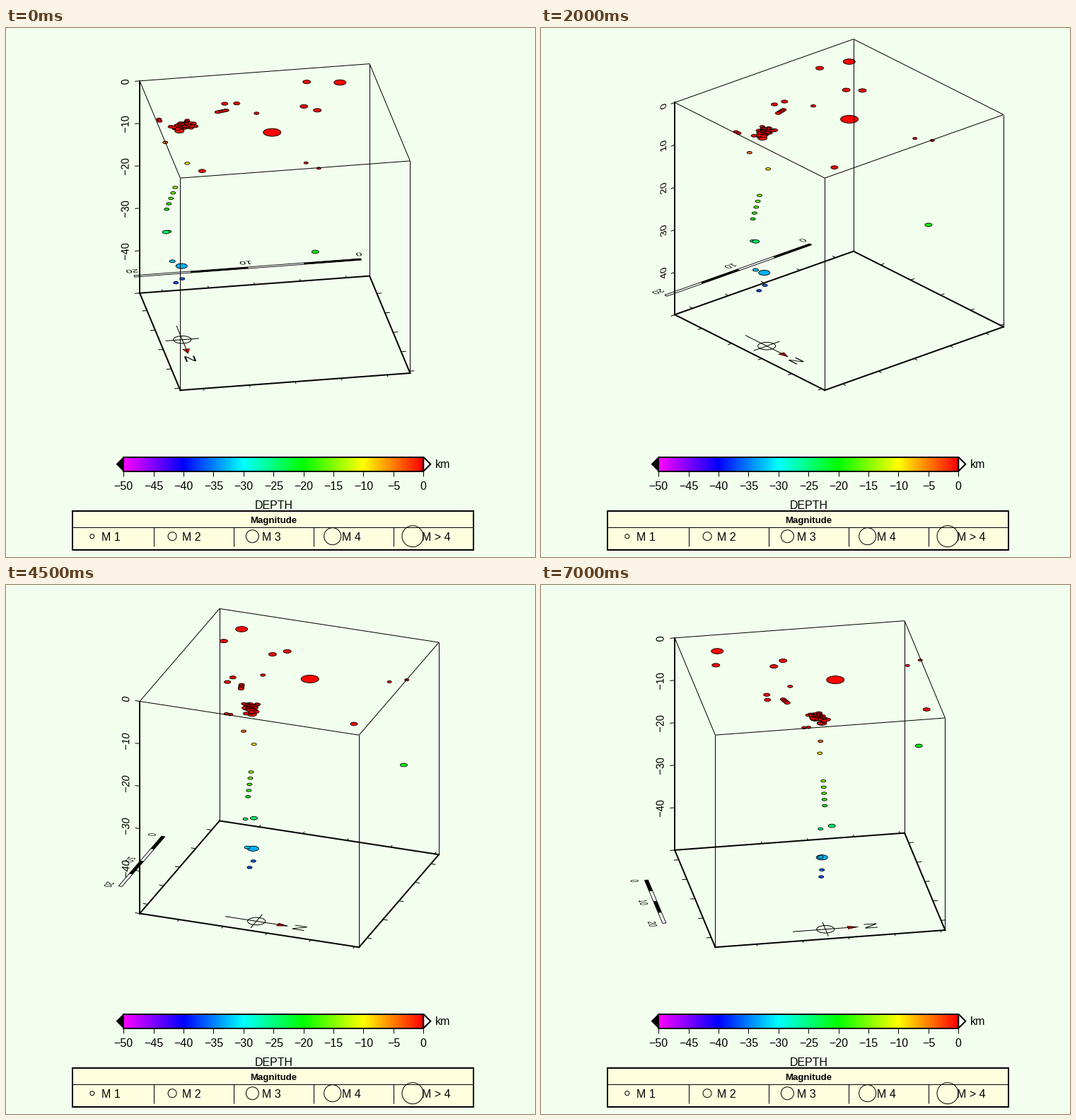
Write a matplotlib script that moves like this. It is 748 by 748 pixels and loops after 8 s.

```python
import colorsys
import math

import numpy as np
import matplotlib.pyplot as plt
from matplotlib.animation import FuncAnimation
from matplotlib.lines import Line2D
from matplotlib.patches import Circle, Ellipse, PathPatch, Polygon, Rectangle
from matplotlib.textpath import TextPath
from matplotlib.transforms import Affine2D

SIZE, DPI = 748, 64
PX = 72 / DPI
PAPER, CREAM = "#f3ffee", "#ffffdf"
SANS = "Liberation Sans"
FONT = 16

TILT, LIFT = math.sin(math.radians(25)), math.cos(math.radians(25))
HALF, HEIGHT = 165, 300
KM = HEIGHT / 50
START, STEP = 10, 30

# Ground directions of the box in the first view (y points to the viewer)
EAST = np.array([math.cos(math.radians(START)), -math.sin(math.radians(START))])
NORTH = np.array([math.sin(math.radians(START)), math.cos(math.radians(START))])
COMPASS = np.array([-131, 22])


def chain(first, last, count=2, width=8):
    """Quakes evenly spaced between two points (ground x, ground y, drop)."""
    return [(*p, width) for p in np.linspace(first, last, count)]


def single(x, y, drop, width):
    return chain((x, y, drop), (x, y, drop), 1, width)


def swarm(count=42):
    """A tight shallow cluster stretched along one diagonal."""
    rng = np.random.default_rng(7)
    x = np.clip(rng.normal(-125, 9, count), -147, -102)
    y = 9 - 0.6 * (x + 125) + np.clip(rng.normal(0, 6, count), -11, 11)
    drop = np.minimum(abs(rng.normal(0, 3, count)), 6)
    return list(zip(x, y, drop, rng.uniform(7, 10, count)))


def make_quakes():
    surface = (
        single(-4, 36, 1, 26) + single(92, -131, 1, 18) + single(45, -133, 1, 12)
        + single(-103, 165, 1, 11) + single(-26, -28, 1, 8)
        + chain((41, -51, 1), (60, -38, 1), width=12)
        + chain((44, 138, 1), (62, 156, 1), width=7)
        + chain((-71, -60, 1), (-54, -61, 1), width=10)
        + chain((-81, -32, 1), (-69, -38, 1), 4, 9)
        + chain((-164, -8, 1), (-163, -2, 1))
    )
    column = (
        single(-135, 17, 7, 14)
        + chain((-155, 15, 24), (-124, 14, 54))
        + chain((-141, 19, 86), (-153, 21, 116), 5)
        + single(-154, 31, 144, 11) + single(-150, 15, 150, 8)
        + single(-145, 15, 192, 9) + single(-132, 17, 198, 17)
        + chain((-131, 17, 216), (-140, 16, 222))
    )
    return surface + swarm() + column + single(57, 154, 120, 11)


def depth_color(km):
    return colorsys.hsv_to_rgb(km / 60, 1, 1)


def turn(v, view):
    """Project a ground vector onto the screen."""
    a = math.radians(STEP * view)
    c, s = math.cos(a), math.sin(a)
    return np.array([v[0] * c + v[1] * s, (v[1] * c - v[0] * s) * TILT])


def top_centre(view):
    a = math.radians(START + STEP * view)
    reach = HALF * (abs(math.cos(a)) + abs(math.sin(a)))
    return np.array([188.8 + reach, 211.5 - reach * TILT])


fig = plt.figure(figsize=(SIZE / DPI, SIZE / DPI), dpi=DPI, facecolor=PAPER)
ax = fig.add_axes([0, 0, 1, 1])
ax.axis("off")


def line(p, q, width=1):
    return ax.add_line(Line2D([p[0], q[0]], [p[1], q[1]], color="black",
                              lw=width * PX,
                              solid_capstyle="projecting" if width > 1 else "butt"))


def shape(patch, fill="none", width=1):
    patch.set(facecolor=fill, edgecolor="black", linewidth=width * PX)
    return ax.add_patch(patch)


def label(x, y, s, ha="center", size=FONT, weight="normal"):
    ax.text(x, y, s, ha=ha, va="baseline", family=SANS, fontsize=size * PX,
            weight=weight, color="black")


def plane_text(s, centre, right, up, size=FONT):
    """Text lying in a plane given by its projected axes."""
    path = TextPath((0, 0), s, size=size, prop={"family": SANS})
    box = path.get_extents()
    place = Affine2D(np.array([[right[0], up[0], centre[0]],
                               [right[1], up[1], centre[1]],
                               [0, 0, 1]]))
    shift = Affine2D().translate(-(box.x0 + box.x1) / 2, -(box.y0 + box.y1) / 2)
    flat = (shift + place).transform_path(path)
    return ax.add_patch(PathPatch(flat, facecolor="black", lw=0))


def draw_box(view):
    mid, drop = top_centre(view), np.array([0, HEIGHT])
    e, n = turn(EAST, view), turn(NORTH, view)
    signs = [(-1, -1), (1, -1), (1, 1), (-1, 1)]
    corners = [mid + HALF * (i * e + j * n) for i, j in signs]
    arts = []
    for k, p in enumerate(corners):
        q = corners[(k + 1) % 4]
        arts += [line(p, q), line(p, p + drop), line(p + drop, q + drop, 2)]
    for along, out, offset in ((e, n, 0.1), (n, e, 0.18)):
        for side in (-7, 7):
            for t in offset + 0.2 * np.arange(5):
                edge = math.copysign(HALF, side) * out
                p = mid + drop + HALF * (2 * t - 1) * along + edge
                arts.append(line(p, p + side * out))

    # Depth axis on the leftmost edge, lettered in the wider wall
    left = min(range(4), key=lambda k: corners[k][0])
    p = corners[left]
    near = max((corners[(left + d) % 4] for d in (1, 3)), key=lambda c: c[0])
    wall = (near - p) / (2 * HALF)
    arts.append(line(p, p + drop, 2))
    signed = view != 1
    for km in range(0, 51, 10):
        at = p + (0, km * KM)
        arts.append(line(at, at - 7 * wall))
        if km < 50:
            spot = at - 21.3 * wall
            if km and not signed:
                spot = spot - (0, 0.292 * FONT * LIFT)
            text = f"\u2212{km}" if km and signed else str(km)
            arts.append(plane_text(text, spot, (0, -LIFT), -wall))
    return arts


def draw_scale(view):
    along, below = turn(-EAST, view), turn(-NORTH, view)
    length = 236 + 91 * math.cos(math.radians(2 * STEP * view + START))
    middle = top_centre(view) + (0, HEIGHT) + (HALF + 57) * below
    zero = middle - along * length / 2
    arts = []
    for k in range(4):
        p, q = (zero + along * length * m / 4 for m in (k, k + 1))
        w = 2.5 * below
        arts.append(shape(Polygon([p - w, q - w, q + w, p + w]),
                          "white" if k % 2 else "black", 0.9))
    for k, text in enumerate(("0", "10", "20")):
        spot = zero + along * length * k / 2 + 17 * below
        arts.append(plane_text(text, spot, along, -below))
    return arts


def draw_compass(view):
    e, n = turn(EAST, view), turn(NORTH, view)
    c = top_centre(view) + (0, HEIGHT) + turn(COMPASS, view)
    head = [c + 32 * n - 5 * e, c + 46 * n, c + 32 * n + 5 * e]
    return [
        line(c - 24 * e, c + 24 * e),
        line(c - 47 * n, c + 47 * n),
        shape(Ellipse(c, 25, 25 * TILT)),
        shape(Polygon(head), "red", 0.6),
        plane_text("N", c + 65 * n, -e, n, 26),
    ]


def draw_quakes(view):
    mid = top_centre(view)
    spots = []
    for x, y, drop, w in QUAKES:
        p = turn((x, y), view)
        nearness = p[1] / TILT * LIFT - drop * TILT / LIFT
        spots.append((nearness, mid[0] + p[0], mid[1] + p[1] + drop, drop, w))
    return [shape(Ellipse((x, y), w - 1, w * TILT), depth_color(drop / KM), 0.9)
            for _, x, y, drop, w in sorted(spots)]


def draw_colorbar():
    x0, x1, y0, y1 = 166, 590, 606, 626
    mid = (y0 + y1) / 2
    ramp = [[depth_color(50 * (1 - t)) for t in np.linspace(0, 1, x1 - x0)]]
    ax.imshow(ramp, extent=(x0, x1, y1, y0), aspect="auto",
              interpolation="nearest")
    shape(Polygon([(x0, y0), (x0 - 10, mid), (x0, y1)]), "black")
    shape(Polygon([(x1, y0), (x1 + 10, mid), (x1, y1)]), "white", 2)
    shape(Rectangle((x0, y0), x1 - x0, y1 - y0), width=2)
    for value in range(-50, 1, 5):
        x = x1 + (x1 - x0) * value / 50
        line((x, y1), (x, y1 + 7))
        label(x, 652, str(value).replace("-", "\u2212"))
    label(607, 621, "km", "left")
    label(378, 679, "DEPTH")


def draw_legend():
    shape(Rectangle((94, 682), 567, 55), CREAM, 2)
    line((94, 705), (661, 705))
    label(378, 699, "Magnitude", size=13.3, weight="bold")
    for k, text in enumerate(("M 1", "M 2", "M 3", "M 4", "M > 4")):
        x = 121.5 + 113.3 * k
        shape(Circle((x, 718), 3 * (k + 1)))
        label(x + 13.5, 724, text, "left")
        if k:
            line((x - 26.5, 705), (x - 26.5, 732))


QUAKES = make_quakes()
draw_colorbar()
draw_legend()
views = [draw_box(v) + draw_scale(v) + draw_compass(v) + draw_quakes(v)
         for v in range(4)]
# Slight offsets make thin upright and level lines snap to whole pixels
ax.set_xlim(-0.3, SIZE - 0.3)
ax.set_ylim(SIZE - 0.7, -0.7)


def update(i):
    # The first view holds one step, the others five each
    shown = (i + 4) // 5
    for v, arts in enumerate(views):
        for art in arts:
            art.set_visible(v == shown)
    return []


anim = FuncAnimation(fig, update, frames=16, interval=500, repeat=True,
                     repeat_delay=0, blit=False)
plt.show()
```
